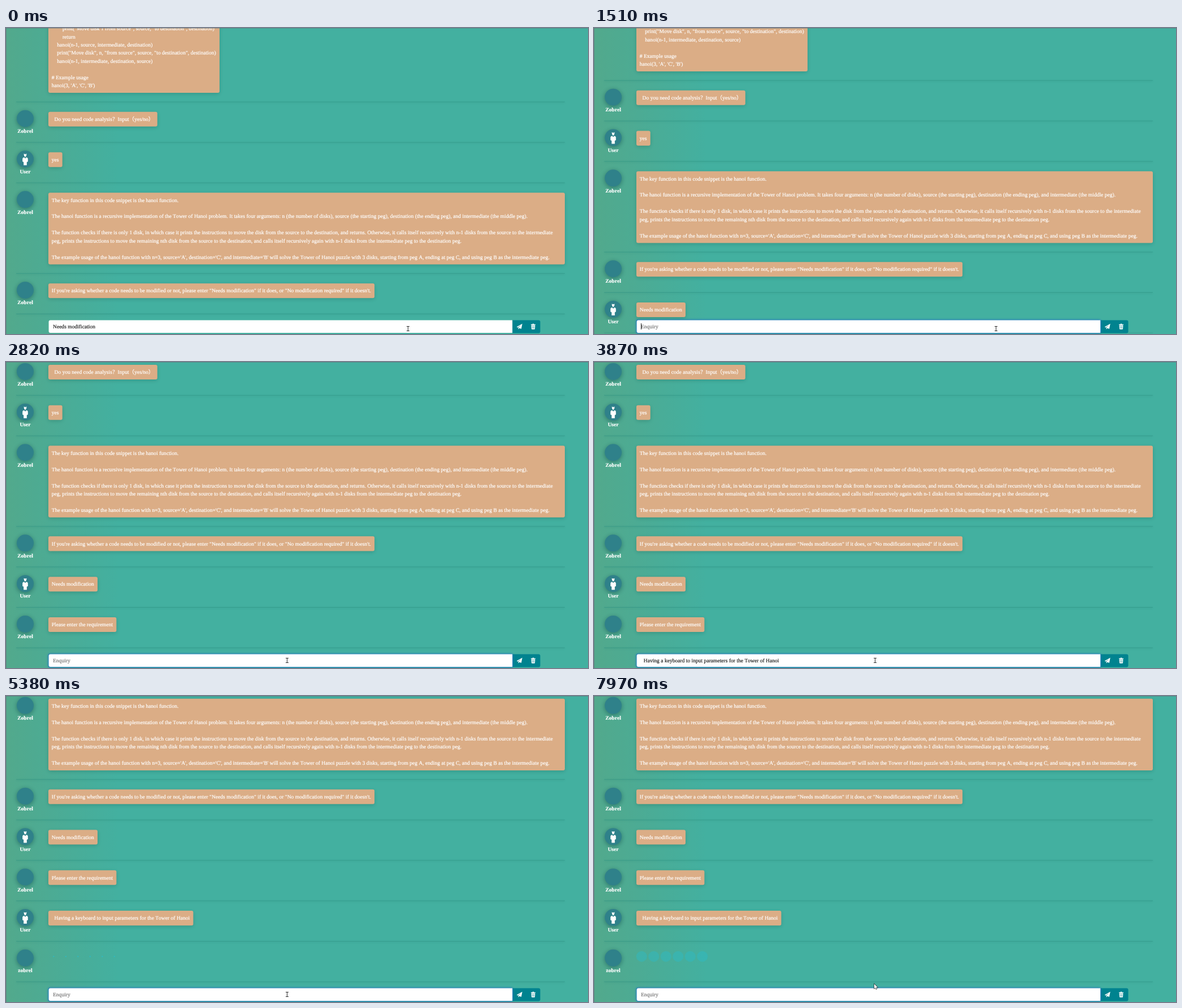
These frames come from a looping animation (1030x543 px, 8 s). An HTML page with a canvas:

```html
<!DOCTYPE html>
<html lang="en">
<head>
<meta charset="utf-8">
<title>Chat</title>
<style>
  html, body { margin: 0; width: 100%; height: 100%; overflow: hidden; background: #43b0a0; }
  canvas { display: block; }
</style>
</head>
<body>
<canvas id="stage" width="1030" height="543"></canvas>
<script>
const ctx = document.getElementById('stage').getContext('2d');
const LOOP = 8000, LINE = 14.43, BUBBLE_X = 75;
const FONT = '9.56px "Liberation Serif", "Noto Sans CJK SC", serif';
const BOT = 'Zobrel', REQUEST = 'Having a keyboard to input parameters for the Tower of Hanoi';
const clamp = v => Math.max(0, Math.min(1, v));

const message = (who, text, from = 0, width) => ({ who, lines: text.split('\n'), from, width });
const dots = (from, until, start, step) => ({ who: BOT.toLowerCase(), lines: [''], from, until, start, step });

const rows = [
  message(BOT, `def hanoi(n, source, destination, intermediate):
    if n == 1:
        print("Move disk 1 from source", source, "to destination", destination)
        return
    hanoi(n-1, source, intermediate, destination)
    print("Move disk", n, "from source", source, "to destination", destination)
    hanoi(n-1, intermediate, destination, source)

# Example usage
hanoi(3, 'A', 'C', 'B')`),
  message(BOT, '  Do you need code analysis？Input（yes/no）'),
  message('User', 'yes'),
  message(BOT, `The key function in this code snippet is the hanoi function.

The hanoi function is a recursive implementation of the Tower of Hanoi problem. It takes four arguments: n (the number of disks), source (the starting peg), destination (the ending peg), and intermediate (the middle peg).

The function checks if there is only 1 disk, in which case it prints the instructions to move the disk from the source to the destination, and returns. Otherwise, it calls itself recursively with n-1 disks from the source to the intermediate
peg, prints the instructions to move the remaining nth disk from the source to the destination, and calls itself recursively again with n-1 disks from the intermediate peg to the destination peg.

The example usage of the hanoi function with n=3, source='A', destination='C', and intermediate='B' will solve the Tower of Hanoi puzzle with 3 disks, starting from peg A, ending at peg C, and using peg B as the intermediate peg.`, 0, 914),
  message(BOT, 'If you\'re asking whether a code needs to be modified or not, please enter "Needs modification" if it does, or "No modification required" if it doesn\'t.'),
  message('User', 'Needs modification', 1510),
  dots(1660, 2390, 1503, 146),
  message(BOT, 'Please enter the requirement', 2390),
  message('User', '  ' + REQUEST, 5230),
  dots(5380, LOOP, 5357, 135),
];

function shadow(blur, dy, color) {
  ctx.shadowBlur = blur;
  ctx.shadowOffsetY = dy;
  ctx.shadowColor = color;
}
const noShadow = () => shadow(0, 0, 'transparent');

function box(x, y, w, h, radii, color) {
  ctx.fillStyle = color;
  ctx.beginPath();
  ctx.roundRect(x, y, w, h, radii);
  ctx.fill();
}

function disc(x, y, r, color) {
  ctx.fillStyle = color;
  ctx.beginPath();
  ctx.arc(x, y, r, 0, 7);
  ctx.fill();
}

function shape(x, y, path, color) {
  ctx.save();
  ctx.translate(x, y);
  ctx.fillStyle = color;
  ctx.fill(new Path2D(path));
  ctx.restore();
}

// a hairline stroke gives the small type its weight
function write(text, x, y, color, font = FONT) {
  ctx.font = font;
  ctx.fillStyle = ctx.strokeStyle = color;
  ctx.lineWidth = 0.2;
  ctx.fillText(text, x, y);
  ctx.strokeText(text, x, y);
}

function drawBackground() {
  const g = ctx.createLinearGradient(0, 0, 200, 0);
  g.addColorStop(0, '#52a98c');
  g.addColorStop(0.4, '#4cab94');
  g.addColorStop(1, '#43b0a0');
  ctx.fillStyle = g;
  ctx.fillRect(0, 0, 1030, 543);
}

function drawAvatar(who, y) {
  shadow(9, 2, 'rgba(0,50,60,.45)');
  disc(34, y + 12, 15, '#2f818a');
  noShadow();
  if (who === 'User') {
    shape(34, y + 12, 'M-2.5-9.5L0-8.6L2.5-9.5L1.9-5.5L0-3.6L-1.9-5.5Z', '#fff');
    shape(34, y + 12, 'M-1.5-3L0-.8L1.5-3L3.5-2.6Q4.8-2 4.8 0V4.5L2.8 5.5V11H-2.8V5.5L-4.8 4.5V0Q-4.8-2-3.5-2.6Z', '#fff');
  }
  ctx.textAlign = 'center';
  write(who, 34, y + 37.3, '#fff', 'bold ' + FONT);
  ctx.textAlign = 'left';
}

function drawDots(row, y, t) {
  const shown = row.from + Math.floor((t - row.from) / row.step) * row.step;
  const p = (shown - row.start) / 681 % 1;
  ctx.globalAlpha = clamp(2 - 2 * p);
  for (let i = 0; i < 6; i++)
    disc(84.3 + 21.5 * i, y + 9.3, 9.5 * Math.sin(Math.PI * Math.min(p, 0.5)), '#28bccb');
  ctx.globalAlpha = 1;
}

function drawBubble(row, y, h) {
  ctx.font = FONT;
  const w = row.width || 12 + Math.max(...row.lines.map(s => ctx.measureText(s).width));
  shadow(7, 2, 'rgba(0,60,50,.22)');
  box(BUBBLE_X, y, w, h, 3, '#dbad86');
  noShadow();
  row.lines.forEach((s, i) => write(s, BUBBLE_X + 5.8, y + 16.3 + LINE * i, '#fff'));
}

function drawDivider(y) {
  shadow(4, 1, 'rgba(0,70,65,.35)');
  ctx.fillStyle = 'rgba(45,145,130,.55)';
  ctx.fillRect(18, y - 0.5, 971, 1);
  noShadow();
}

function drawChat(t) {
  const scroll = t < 1510 ? 0 : t < 1660 ? 38 : t < 5230 ? 143.8 : t < 5380 ? 148.8 : 287.5;
  let y = -41 - scroll;
  for (const row of rows) {
    if (t < row.from || t >= row.until) continue;
    const h = row.lines.length * LINE + 11.7, used = Math.max(h, 38.1);
    if (y < 560 && y + used > -30) {
      drawAvatar(row.who, y);
      if (row.start) drawDots(row, y, t);
      else drawBubble(row, y, h);
      drawDivider(y + used + 16.2);
    }
    y += used + 33.7;
  }
}

function caretOn(t) {
  if (t < 680) return false;
  if (t < 5380) {
    const flips = [680, 1230, 1510, 1940, 2390, 2820, 3220, 3870, 4430, 4860, 5230];
    return flips.filter(f => f <= t).length % 2 === 1;
  }
  return Math.floor((t - 5370) / 530) % 2 === 1;
}

function drawInput(t) {
  const text = t < 1510 ? 'Needs modification' : t >= 3220 && t < 5230 ? '  ' + REQUEST : '';
  const focus = t < 680 ? 0 : t < 830 ? 0.6 : 1;
  box(896, 518.5, 49.5, 23, [0, 3, 3, 0], '#00838f');
  if (focus) {
    shadow(4, 0, `rgba(20,105,190,${0.8 * focus})`);
    box(74.7, 517.7, 822.3, 24, 3, `rgba(35,125,190,${0.85 * focus})`);
    noShadow();
  }
  box(75.6, 518.6, 820.6, 22.4, [3, 0, 0, 3], '#fff');
  write(text || 'Enquiry', 83, 533.2, text ? '#222' : '#777');
  if (caretOn(t)) {
    ctx.fillStyle = '#222';
    ctx.fillRect(Math.round(83 + ctx.measureText(text).width), 524, 1, 11);
  }
  // paper plane and bin
  shape(908.7, 529.8, 'M5-5L3.2 4.3L-.2 2.7L-2 5V2L3.2-3L-3 1.6L-5 .7Z', '#fff');
  shape(933, 529.8, 'M-4-4H-1.6L-1-5H1L1.6-4H4V-2.8H-4ZM-3.4-2.2H3.4L3 4.2Q2.9 5 2 5H-2Q-2.9 5-3 4.2Z', '#fff');
  ctx.fillStyle = 'rgba(0,131,143,.75)';
  for (const x of [-1.9, -0.3, 1.3]) ctx.fillRect(933 + x, 529, 0.7, 4.4);
}

function drawPointer(t) {
  if (t >= 5910) {
    const x = t < 6460 ? 494 : 494 + 2 * clamp((t - 6460) / 1400);
    ctx.strokeStyle = '#222';
    ctx.lineWidth = 1.2;
    const arrow = new Path2D('M0 0V8.2L1.9 6.5L3.2 9.3L4.4 8.7L3.2 6H5.8Z');
    ctx.save();
    ctx.translate(x, 511);
    ctx.stroke(arrow);
    ctx.fillStyle = '#fff';
    ctx.fill(arrow);
    ctx.restore();
    return;
  }
  const k = clamp((t - 1790) / 600);
  const x = Math.round(711 - 214 * k), y = Math.round(533 - 4 * k);
  ctx.fillStyle = '#333';
  ctx.fillRect(x, y - 4, 1, 9);
  for (const dy of [-4, 4]) ctx.fillRect(x - 2, y + dy, 5, 1);
}

function draw(now) {
  const t = now % LOOP;
  ctx.textRendering = 'geometricPrecision';
  ctx.fontKerning = 'none';
  drawBackground();
  ctx.save();
  ctx.beginPath();
  ctx.rect(0, 0, 1030, 541.5);
  ctx.clip();
  drawChat(t);
  ctx.restore();
  ctx.fillStyle = 'rgba(95,115,120,.55)';
  ctx.fillRect(0, 0, 1030, 1);
  ctx.fillRect(0, 0, 1, 543);
  drawInput(t);
  drawPointer(t);
}

const start = performance.now();
(function tick() {
  draw(performance.now() - start);
  requestAnimationFrame(tick);
})();
</script>
</body>
</html>
```
